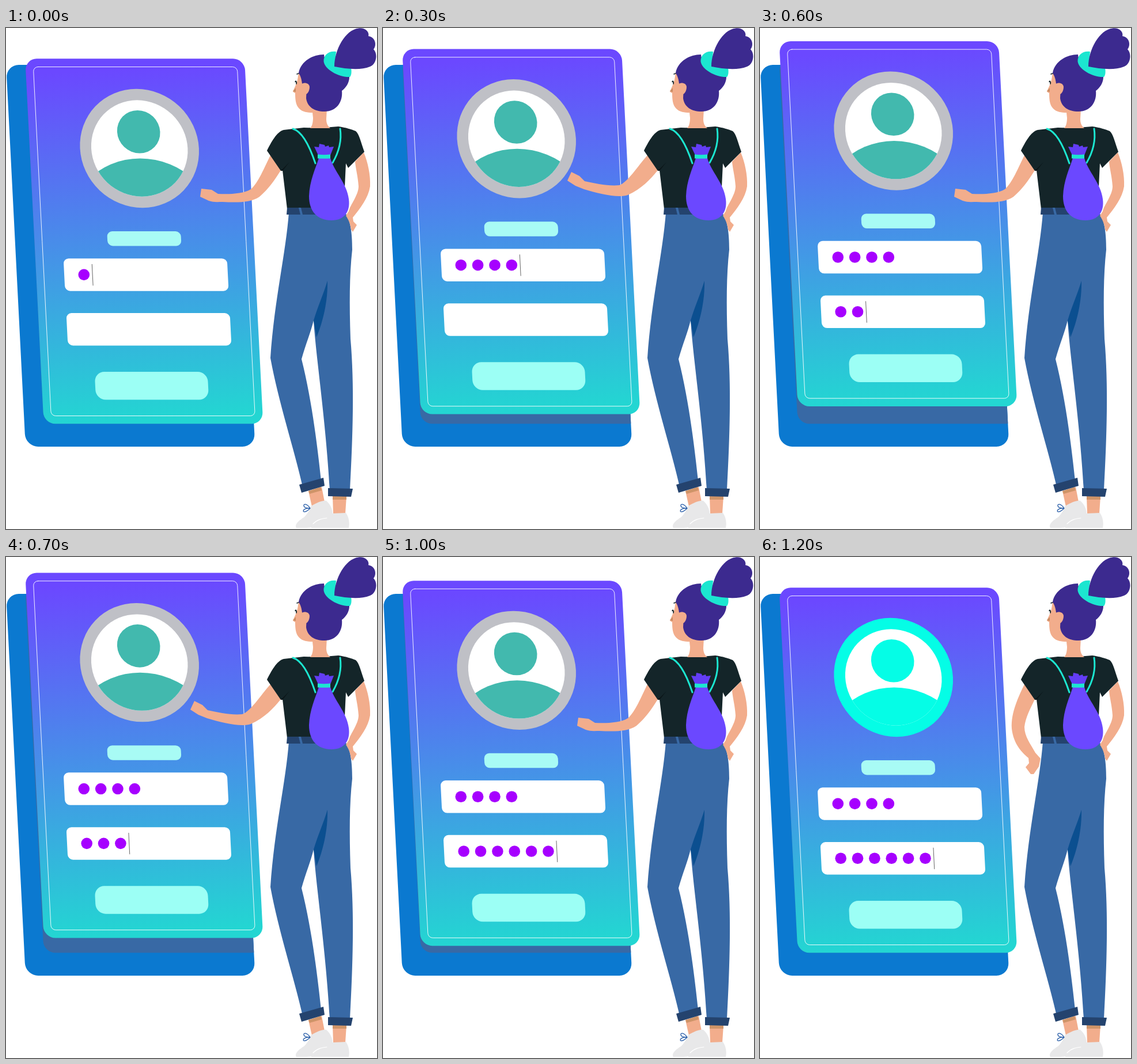
Recreate the animation shown at these times as an HTML page with a canvas. Size 644 px wide and 870 px high, loop 4200 ms.

```html
<!DOCTYPE html>
<html lang="en">
<head>
<meta charset="utf-8">
<title>Login card</title>
<style>
  html, body { margin: 0; width: 100%; height: 100%; overflow: hidden; background: #fff; }
  canvas { display: block; width: 644px; height: 870px; }
</style>
</head>
<body>
<canvas id="stage" width="644" height="870"></canvas>
<script>
const ctx = document.getElementById('stage').getContext('2d');
const LOOP = 4200, STEP = 100, LAST = 12;
const SLANT = 0.051;
const SKIN = '#f2ad8c', HAIR = '#3c2a8f', MINT = '#1ce6d0', SHIRT = '#142529',
      JEANS = '#3869a5', CUFF = '#24436e', BAG = '#6b48ff', SHOE = '#e8e8e9';

// Runs draw with a horizontal shear that leaves the row y in place.
function slanted(y, draw) {
  ctx.save();
  ctx.transform(1, 0, SLANT, 1, -SLANT * y, 0);
  draw();
  ctx.restore();
}

// x is the left edge at the box's middle row.
function box(x, y, w, h, r, color, outline) {
  slanted(y + h / 2, () => {
    ctx.beginPath();
    ctx.roundRect(x, y, w, h, r);
  });
  if (outline) {
    ctx.strokeStyle = color;
    ctx.lineWidth = 1;
    ctx.stroke();
  } else {
    ctx.fillStyle = color;
    ctx.fill();
  }
}

function disc(x, y, r, color) {
  slanted(y, () => {
    ctx.beginPath();
    ctx.arc(x, y, r, 0, Math.PI * 2);
  });
  ctx.fillStyle = color;
  ctx.fill();
}

function fill(color, d) {
  ctx.fillStyle = color;
  ctx.fill(new Path2D(d));
}

function stroke(color, width, d) {
  ctx.strokeStyle = color;
  ctx.lineWidth = width;
  ctx.lineCap = 'round';
  ctx.stroke(new Path2D(d));
}

function cardBox(color) {
  box(49.4, 53.3, 380.8, 634, 20, color);
}

function backPanel() {
  box(17, 64, 398.5, 663, 22, '#0b79d0');
  ctx.save();
  ctx.clip();
  cardBox(JEANS);
  ctx.restore();
}

function avatar(done) {
  const ink = done ? '#05fde6' : '#42b9ae';
  disc(231.7, 209, 103.2, done ? ink : '#bfc0c6');
  disc(231.7, 209, 83.7, '#fff');
  ctx.save();
  ctx.clip();
  disc(239.7, 361, 134.5, ink);
  ctx.restore();
  disc(230.2, 180.2, 37.3, ink);
}

function field(x, y, count, cursor) {
  box(x, y, 284, 56.5, 9, '#fff');
  const cy = y + 28.2, first = x + 34.2, gap = 29.35;
  for (let i = 0; i < count; i++) {
    ctx.fillStyle = '#a600ff';
    ctx.beginPath();
    ctx.arc(first + i * gap, cy, 9.8, 0, Math.PI * 2);
    ctx.fill();
  }
  if (cursor) {
    const cx = first + (count - 1) * gap + 14.9;
    stroke('#666', 1, `M${cx - 0.9} ${cy - 18}L${cx + 0.9} ${cy + 18.5}`);
  }
}

function card(step) {
  const away = Math.min(step, LAST - step);
  const lift = away ? 7.6 + (away - 1) * 4.56 : 0;
  const top = Math.min(step + 1, 4);
  const bottom = Math.max(0, Math.min(step - 4, 6));
  ctx.save();
  ctx.translate(0, -lift);
  const g = ctx.createLinearGradient(224, 70, 256, 680);
  g.addColorStop(0, '#6b48ff');
  g.addColorStop(1, '#23d6d2');
  cardBox(g);
  box(62.8, 67.5, 354, 606, 8, 'rgba(255,255,255,.9)', true);
  avatar(step === LAST);
  box(175.9, 353, 128, 25.5, 9, '#a8fbf5');
  field(101.1, 400.2, top, step < 4);
  field(106, 495, bottom, bottom > 0);
  box(154.9, 597, 196, 48.5, 17, '#9cfff5');
  ctx.restore();
}

const ARMS = {
  hip: 'M459 221C450 240 435 270 437 298C440 325 455 340 466 349L467 358L461 365L470 377L475 377L484 364L487 350L478 340C470 325 459 312 459 295C461 278 470 262 477 247Z',
  low: 'M459 221C448 243 438 269 425 280C412 288 388 289 368 288L357 281L339 279L337 293L352 300C360 303 368 302 376 302C400 303 424 304 440 293C456 279 466 265 477 247Z',
  high: 'M459 221C442 240 424 269 410 273C392 275 368 270 350 266L341 257L327 250L320 265L334 274L349 280C376 288 408 296 425 290C449 279 464 263 477 247Z'
};

function legs() {
  fill(SKIN, 'M525 804L548 797L553 823L531 831Z M567 813H591L589 843H568Z');
  fill('#cf9468', 'M525 804L546 797L548 803L527 809Z M567 813H591V819H567Z');
  fill(SHOE, 'M567 843C558 850 550 853 542 854C534 856 529 862 530 868H595C597 859 595 849 590 842Z');
  fill(SHOE, 'M530 830C540 824 550 820 556 821C563 827 567 836 567 844C556 850 547 857 539 864C531 869 514 868 504 868C500 862 509 855 518 849C524 843 527 836 530 830Z');
  stroke('#fff', 1.2, 'M533 861C541 853 549 852 557 851');
  stroke('#2a5ea8', 1.3, 'M528 834C522 825 516 826 517 830C518 834 524 834 528 834C519 833 514 838 517 840C521 841 525 837 528 834');
  fill(JEANS, 'M491 320C486 390 466 470 459 573C473 650 500 730 515 797L547 786C542 740 532 650 513 575C520 550 529 528 534 508C538 570 555 680 562 802H597C602 710 605 620 598 540C596 480 596 430 601 385C601 355 598 332 588 320Z');
  fill('#0b4f90', 'M558 439C550 465 541 484 534 508L539 537C550 511 559 474 558 439Z');
  fill(CUFF, 'M509 793L551 781L553 795L513 807Z M559 799L602 800L599 814L559 813Z');
}

function torso() {
  fill(SKIN, 'M621 216C628 233 633 255 632 275C629 295 615 313 602 329L603 336L609 342L602 354L599 350C598 340 594 332 590 326L595 318C597 308 612 290 612 275C611 258 607 245 606 232Z');
  fill(SHIRT, 'M517 173Q548 174 577 171C590 173 600 176 607 179C613 184 616 198 622 215L594 243L590 235L586 318L488 314L480 247L477 248L453 213C460 199 470 180 482 177Z');
  fill('#0a1518', 'M492 233L480 248L477 248Z');
  fill(CUFF, 'M488 312H540V324H487Z');
  fill(JEANS, 'M508 312H512L515 324H511Z');
  stroke(MINT, 3, 'M498 175C515 180 528 208 537 235M580 175C583 195 578 215 567 234');
  fill(BAG, 'M543 226C537 245 527 265 526 292C526 318 540 334 565 334C588 334 598 318 595 297C592 270 570 250 563 226Z');
  fill('#633df5', 'M535 206L543 207L544 201L553 203L554 206L560 204L561 207L569 206L563 221H542Z');
  fill(MINT, 'M541 219.5Q552 221 563 219.5V226.5Q552 227 541 226.5Z');
}

function head() {
  fill(SKIN, 'M508 78L506 90C504 98 500 105 498 110C499 112 501 112 502 113C502 125 503 134 509 140C515 146 523 147 532 147L533 156C533 162 532 170 528 174H563C558 170 556 165 556 158L557 140L540 90Z');
  fill('#c98d63', 'M503 104L498 110L503 111Z');
  stroke('#142529', 1.6, 'M503 92Q505 94 504 97M502 93L504 94M505 80L508 79');
  fill(HAIR, 'M508 78C512 57 533 46 552 46C553 65 575 82 596 85C596 95 590 104 583 109C585 128 574 145 553 145C535 145 523 137 521 122L522 100L514 97C513 88 511 83 508 78Z');
  fill(SKIN, 'M513 97C518 94 526 95 527 102C527 110 523 116 517 116Z');
  fill(MINT, 'M573 41C560 39 551 47 551.5 58C553 72 578 86 597 85C600 82 600 75 599 69L571 67Z');
  fill(HAIR, 'M570 67C570 38 589 3 612 0.5C625 -1 631 8 629 14C641 16 644 29 638 37C646 45 643 63 632 67C615 74 590 71 570 67Z');
}

function frame(now) {
  const step = Math.min(LAST, Math.floor((now % LOOP) / STEP));
  ctx.fillStyle = '#fff';
  ctx.fillRect(0, 0, 644, 870);
  backPanel();
  card(step);
  legs();
  fill(SKIN, ARMS[step === LAST ? 'hip' : step % 2 ? 'high' : 'low']);
  torso();
  head();
}

const start = performance.now();
function tick() {
  frame(performance.now() - start);
  requestAnimationFrame(tick);
}
tick();
</script>
</body>
</html>
```
